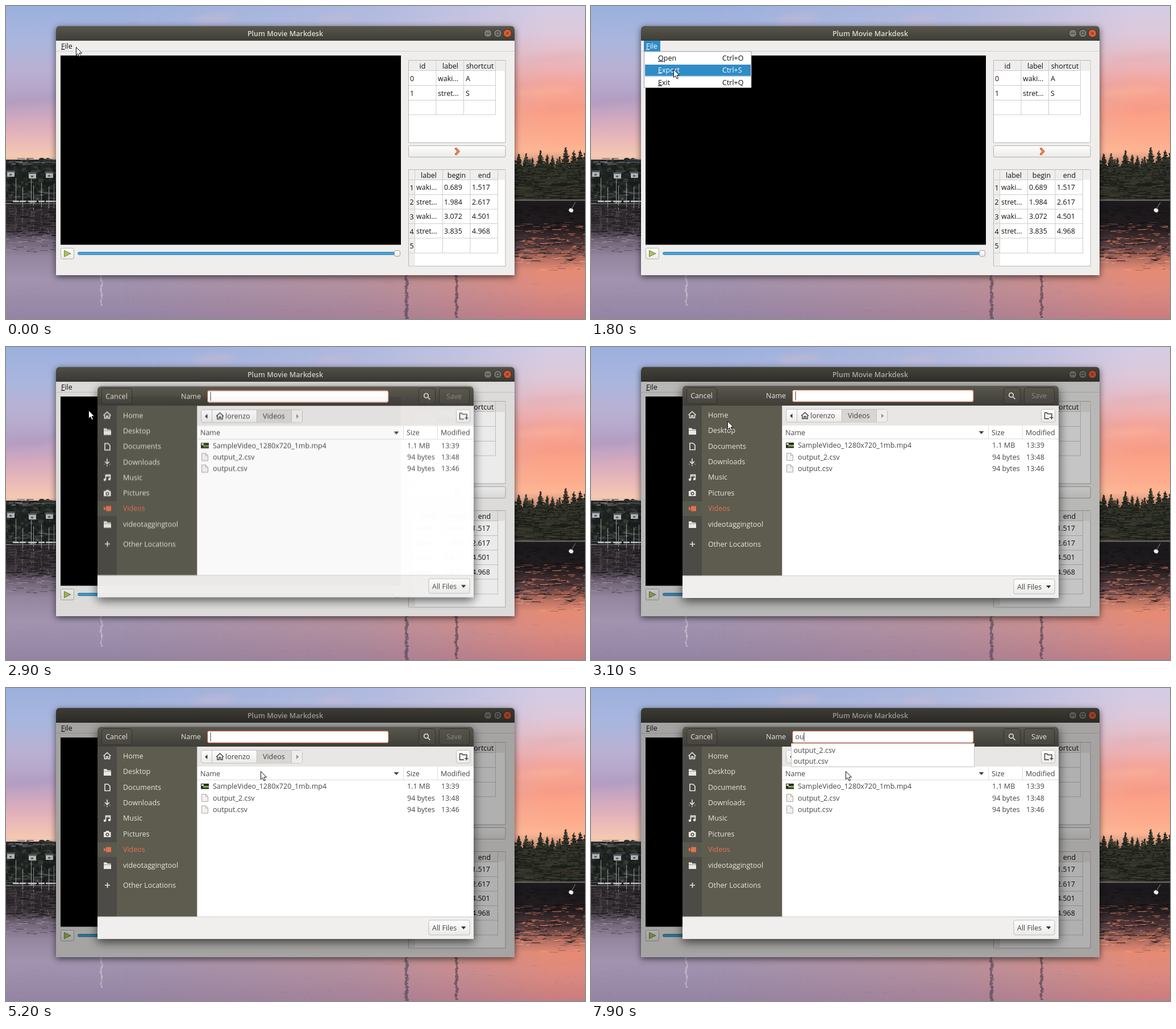
Recreate the animation shown at these times as an HTML page with a canvas. Size 1019 px wide and 550 px high, loop 8000 ms.

```html
<!DOCTYPE html>
<html lang="en">
<head>
<meta charset="utf-8">
<title>Plum Movie Markdesk</title>
<style>
html, body { margin: 0; width: 100%; height: 100%; overflow: hidden; background: #a093ae; }
.sky, canvas, svg.ui { position: absolute; left: 0; top: 0; width: 1019px; height: 550px; }
.west { background: linear-gradient(#9bb0dd 0, #a9b6de 60px, #b9b1d3 110px, #b5a4c8 155px, #c9a6c1 190px, #e6b5ba 228px, #f4c9b2 264px,
  #2b2729 348px, #393338 390px, #6f6374 412px, #94869f 440px, #a294b0 480px, #9484a4 550px); }
.east { background: linear-gradient(#d3cde6 0, #dec8d9 50px, #e9bac0 95px, #f3a59c 135px, #fb9f86 185px, #fdac8c 235px, #fdb593 255px,
  #19171a 346px, #211b1d 390px, #51383a 420px, #b87161 445px, #e68b74 465px, #dd8a7e 500px, #c87c7f 550px);
  -webkit-mask-image: linear-gradient(90deg, transparent 20%, #0005 62%, #000a 80%, #000 94%);
  mask-image: linear-gradient(90deg, transparent 20%, #0005 62%, #000a 80%, #000 94%); }

text { font: 12.5px "Open Sans", "Noto Sans", sans-serif; fill: #111; transform: translateY(4.6px); white-space: pre; }
.mid { text-anchor: middle; }
.title { font-weight: 600; fill: #dfdbd2; }
.u { text-decoration: underline; }
.lite text { fill: #e9e6df; }
.files text { fill: #454545; }
.grid { fill: none; stroke: #cfcdcb; }
.icon { fill: none; stroke: #ebe8e1; stroke-width: 1.6; }
.solid { fill: #ebe8e1; }
.frame { filter: drop-shadow(0 3px 6px #0009); }
.lift { filter: drop-shadow(0 5px 9px #000a); }

.a { animation: 8s step-end infinite; }
.menu { opacity: 0; animation-name: menu; }
.bar { opacity: 0; animation-name: bar; }
.open { animation-name: open; }
.export { animation-name: export; }
.dim { opacity: 0; animation-name: dim; }
.dialog { opacity: 0; transform-origin: 492px 254.5px; animation-name: dialog; }
.caret { animation-name: caret; }
.one { opacity: 0; animation-name: one; }
.two { opacity: 0; animation-name: two; }
.popup { opacity: 0; animation-name: popup; }
.lite .save { fill: #8b8980; animation-name: save; }
.pointer { animation-name: pointer; }

@keyframes menu { 0% { opacity: 0 } 6.25% { opacity: 1 } 33.75% { opacity: 0 } }
@keyframes bar {
  0% { opacity: 0 } 20% { opacity: 1; transform: none }
  22.5% { opacity: 1; transform: translateY(21.5px) } 33.75% { opacity: 0 }
}
@keyframes open { 0% { fill: #111 } 20% { fill: #fff } 22.5% { fill: #111 } }
@keyframes export { 0% { fill: #111 } 22.5% { fill: #fff } 33.75% { fill: #111 } }
@keyframes dim {
  0% { opacity: 0 } 36.25% { opacity: .08 } 37.5% { opacity: .16 }
  38.75% { opacity: .23 } 40% { opacity: .28 } 41.25% { opacity: .31 }
}
@keyframes dialog {
  0% { opacity: 0; transform: none } 36.25% { opacity: .98; transform: scaleY(.9946) }
  37.5% { opacity: 1; transform: none }
}
@keyframes caret {
  0% { opacity: 1; transform: none } 46.25% { opacity: 0 } 52.5% { opacity: 1 } 60% { opacity: 0 }
  65% { opacity: 1 } 75% { opacity: 0 } 80% { opacity: 1 } 90% { opacity: 0 }
  95% { opacity: 1; transform: translateX(7.5px) } 98.75% { opacity: 1; transform: translateX(15px) }
}
@keyframes one { 0% { opacity: 0 } 95% { opacity: 1 } }
@keyframes two { 0% { opacity: 0 } 98.75% { opacity: 1 } }
@keyframes popup { 0% { opacity: 0 } 95% { opacity: 1 } }
@keyframes save { 0% { fill: #8b8980 } 97.5% { fill: #e9e6df } }
@keyframes pointer {
  0% { transform: translate(123px, 72px) }
  16.25% { transform: translate(125px, 74px) }
  17.5% { transform: translate(129px, 77px) }
  20% { transform: translate(134px, 87px) }
  21.25% { transform: translate(140px, 100px) }
  22.5% { transform: translate(145px, 111px) }
  37.5% { transform: translate(175px, 117px) }
  38.75% { transform: translate(240px, 130px) }
  40% { transform: translate(312px, 143px) }
  41.25% { transform: translate(353px, 150px) }
  42.5% { transform: translate(349px, 151px) }
  43.75% { transform: translate(345px, 152px) }
  45% { transform: translate(368px, 154px) }
  46.25% { transform: translate(405px, 157px) }
  47.5% { transform: translate(440px, 160px) }
  48.75% { transform: translate(468px, 162px) }
  50% { transform: translate(483px, 162px) }
  52.5% { transform: translate(458px, 163px) }
  55% { transform: translate(452px, 152px) }
  60% { transform: translate(448px, 146px) }
}
</style>
</head>
<body>
<div class="sky west"></div>
<div class="sky east"></div>
<canvas width="1019" height="550"></canvas>

<svg class="ui" viewBox="0 0 1019 550">
<defs>
  <linearGradient id="head" x2="0" y2="1"><stop stop-color="#59574d"/><stop offset="1" stop-color="#3e3d37"/></linearGradient>
  <linearGradient id="btn" x2="0" y2="1"><stop stop-color="#fefefe"/><stop offset="1" stop-color="#ebeae9"/></linearGradient>
  <linearGradient id="dark" x2="0" y2="1"><stop stop-color="#57554b"/><stop offset="1" stop-color="#47453e"/></linearGradient>
  <linearGradient id="blue" x2="0" y2="1"><stop stop-color="#2d86bd"/><stop offset=".5" stop-color="#4db4ec"/><stop offset="1" stop-color="#2a7fb3"/></linearGradient>
  <path id="folder" d="M-6-5.500h5l1.500 2h6v1.500h-12.500zM-6-1.500h13v7.500h-13z"/>
  <path id="home" d="M-6.500 .5 0-5.500 6.500 .5M-4.500 0v5.500h3.200v-4h2.600v4h3.200V0"/>
  <path id="sheet" d="M.5.5h7l4 4v9H.5zM7.500.5v4h4" fill="#f2f1ef" stroke="#a9a7a3"/>
</defs>

<path class="frame" d="M88 473V42q0-7 7-7h793q7 0 7 7v431z" fill="#efeeed"/>
<path d="M88 61V42q0-7 7-7h793q7 0 7 7v19z" fill="url(#head)"/>
<path d="M93 35.500h797" stroke="#6d6b61"/>
<text class="mid title" x="491.500" y="48">Plum Movie Markdesk</text>
<g stroke="#33322d">
  <circle cx="848" cy="48" r="7" fill="#7d7b72"/>
  <circle cx="865.500" cy="48" r="7" fill="#7d7b72"/>
  <circle cx="882.500" cy="48" r="7" fill="#e9592f"/>
  <path d="M844.500 48h7M863 45.500h5v5h-5zM880 45.500l5 5m0-5l-5 5" fill="none"/>
</g>
<path d="M88 79.500h807" stroke="#d3d1cf"/>
<text x="97" y="70"><tspan class="u">F</tspan>ile</text>
<path d="M96 87h599v332.500h-599z"/>

<rect x="96.500" y="425.500" width="23" height="19" rx="2" fill="url(#btn)" stroke="#b3b1af"/>
<path d="M102.500 429.500v11l11.500-5.500z" fill="#a9c262" stroke="#718539"/>
<rect x="126.500" y="432.500" width="566" height="4.500" rx="2" fill="url(#blue)" stroke="#2a78a8" stroke-width=".8"/>
<rect x="683.500" y="429.500" width="10" height="10.500" rx="3" fill="url(#btn)" stroke="#9c9a98"/>

<path d="M708.500 95.500h170.500v144.500h-170.500z" fill="#fff" stroke="#b9b7b5"/>
<path d="M709 96h169.500v18H709z" fill="#efeeed"/>
<path class="grid" d="M709 113.500h153M709 139.500h153M709 165.500h153M709 191h153M757 96v95M805.500 96v95M861.500 96v95"/>
<text class="mid" x="733" y="105">id</text><text class="mid" x="782" y="105">label</text><text class="mid" x="834" y="105">shortcut</text>
<text x="711" y="127">0</text><text x="760" y="127">waki…</text><text x="809" y="127">A</text>
<text x="711" y="153">1</text><text x="760" y="153">stret…</text><text x="809" y="153">S</text>

<rect x="708.500" y="245.500" width="170.500" height="20" rx="2" fill="url(#btn)" stroke="#b3b1af"/>
<path d="M790 250.500l2.500-1.500 6 6.500-6 6.500-2.500-1.500 4-5z" fill="#f0895c" stroke="#b8431f"/>

<path d="M708.500 287.500h170.500v169.500h-170.500z" fill="#fff" stroke="#b9b7b5"/>
<path d="M709 288h169.500v17.500h-158.500v151H709z" fill="#efeeed"/>
<path class="grid" d="M709 305.500h157M709 331.500h157M709 357h157M709 382.500h157M709 408h157M709 434h157M719.500 288v146M768.500 288v146M817 288v146M865.500 288v146"/>
<text class="mid" x="744" y="297">label</text><text class="mid" x="793" y="297">begin</text><text class="mid" x="842" y="297">end</text>
<g id="clips"></g>

<path class="a dim" d="M88 473V42q0-7 7-7h793q7 0 7 7v431z"/>

<g class="a menu">
  <path d="M93 61h29v19H93z" fill="#308cc6"/>
  <text x="97" y="70" style="fill:#fff"><tspan class="u">F</tspan>ile</text>
  <path d="M93.500 80h188.500v63.500h-188.500z" fill="#fff" stroke="#a5a5a5"/>
  <path class="a bar" d="M95 81h186v20.500H95z" fill="#308cc6"/>
  <text class="a open" x="118" y="91"><tspan class="u">O</tspan>pen</text><text class="a open" x="231" y="91">Ctrl+O</text>
  <text class="a export" x="118" y="112"><tspan class="u">E</tspan>xport</text><text class="a export" x="231" y="112">Ctrl+S</text>
  <text x="118" y="134"><tspan class="u">E</tspan>xit</text><text x="231" y="134">Ctrl+Q</text>
</g>

<g class="a dialog">
  <path class="lift" d="M161 441V75q0-7 7-7h648q7 0 7 7v366z" fill="#f0efed"/>
  <path d="M161 103V75q0-7 7-7h648q7 0 7 7v28z" fill="url(#head)"/>
  <path d="M166 68.500h652" stroke="#6b695f"/>
  <g fill="url(#dark)" stroke="#34332d">
    <rect x="168.500" y="71.500" width="53" height="28" rx="4"/>
    <rect x="726.500" y="71.500" width="29" height="28" rx="4"/>
    <rect x="762.500" y="71.500" width="53" height="28" rx="4"/>
  </g>
  <g class="lite">
    <text class="mid" x="194.500" y="85.500">Cancel</text>
    <text x="308" y="85.500">Name</text>
    <text class="mid a save" x="788.500" y="85.500">Save</text>
  </g>
  <g class="icon" stroke-width="2"><circle cx="739.500" cy="84.500" r="3.800"/><path d="M742.500 87.500l4 4"/></g>
  <rect x="354.500" y="75.500" width="318.500" height="21" rx="3" fill="#fff" stroke="#b9634a"/>
  <rect x="355.500" y="76.500" width="316.500" height="19" rx="2" fill="none" stroke="#f3d3c6"/>
  <path class="a caret" d="M360 78v15.500" stroke="#333"/>

  <path d="M161 103h175.500v299H161z" fill="#5d5c4f"/>
  <path d="M161 103h34v299h-34z" fill="#4c4b46"/>
  <path d="M161 271h34v26h-34z" fill="#5a594e"/>
  <g id="places" class="lite"></g>
  <use href="#home" class="icon" x="178" y="119"/>
  <use href="#folder" class="solid" x="178" y="148"/>
  <path class="icon" d="M174 169h5.500l3.500 3.500v8h-9z"/>
  <path class="icon" d="M178 196v9m-4-4l4 4 4-4M177 208h2M172.500 206h1m9 0h1"/>
  <path class="icon" d="M175.500 233v-8.500h8v7.500M175.500 226.500h8"/>
  <g class="solid"><circle cx="174" cy="233" r="2.200"/><circle cx="182" cy="232" r="2.200"/></g>
  <path class="solid" d="M172 253h3l1.500-2h4l1.500 2h2.500v9H172z"/>
  <circle cx="178.500" cy="257.500" r="2.300" fill="none" stroke="#4c4b46" stroke-width="1.500"/>
  <path d="M176 279.500h9v9h-9zM172 280.500l3.500 2.500v2l-3.500 2.500z" fill="#e2704f"/>
  <use href="#folder" class="solid" x="178" y="312"/>
  <path class="icon" d="M174 346.500h9M178.500 342v9"/>

  <path d="M336.500 103h486.500v35H336.500z" fill="#e9e7e5"/>
  <path d="M336.500 138h486.500v263.500H336.500z" fill="#fff"/>
  <path d="M337 161.500h486M699.500 138v23M759.500 138v23" stroke="#dddbd8"/>
  <path d="M161 402h662" stroke="#d2d0cd"/>
  <rect x="343.500" y="109.500" width="178" height="22.500" rx="3" fill="url(#btn)" stroke="#c2bfbb"/>
  <path d="M441.500 110h61v21.500h-61z" fill="#d8d6d3"/>
  <path d="M503 110h18v21.500h-18z" fill="#efedeb"/>
  <path d="M362.500 110v22M441.500 110v22M502.500 110v22" stroke="#c2bfbb"/>
  <path d="M354.500 117v8l-4.500-4z" fill="#3b3b3b"/>
  <path d="M511 117v8l4.500-4z" fill="#9a9896"/>
  <use href="#home" x="376.500" y="120.500" fill="none" stroke="#444" stroke-width="1.500"/>
  <rect x="792.500" y="109.500" width="24" height="22.500" rx="3" fill="url(#btn)" stroke="#c2bfbb"/>
  <path d="M806 126h-7.500v-10.500h4l1.500 2h7v4M807.500 124h6M810.500 121v6" fill="none" stroke="#3d3d3d" stroke-width="1.400"/>
  <path d="M682.500 148h9l-4.500 5z" fill="#444"/>
  <path d="M343 168h14v9.500h-14z" fill="#26301f"/><path d="M347 172h10v3h-10z" fill="#87a850"/><path d="M344 169h4v3h-4z" fill="#d9ddd0"/>
  <use href="#sheet" x="344" y="186"/><use href="#sheet" x="344" y="206.500"/>
  <rect x="744" y="408" width="72" height="26" rx="3" fill="url(#btn)" stroke="#c0bdb9"/>
  <path d="M801 419h8.500l-4.200 5z" fill="#333"/>
  <g class="files">
    <text x="386" y="120.500">lorenzo</text><text x="452" y="120.500">Videos</text>
    <text x="342" y="150">Name</text><text x="705" y="150">Size</text><text x="765" y="150">Modified</text>
    <text x="364" y="172.500">SampleVideo_1280x720_1mb.mp4</text><text x="706" y="172.500">1.1 MB</text><text x="766" y="172.500">13:39</text>
    <text x="364" y="193">output_2.csv</text><text x="706" y="193">94 bytes</text><text x="766" y="193">13:48</text>
    <text x="364" y="213.500">output.csv</text><text x="706" y="213.500">94 bytes</text><text x="766" y="213.500">13:46</text>
    <text x="750" y="421.500">All Files</text>
    <text class="a one" x="359.500" y="85.500">o</text><text class="a two" x="367" y="85.500">u</text>
    <g class="a popup">
      <path d="M352.500 97.500h322v41h-322z" fill="#fff" stroke="#c4c2bf"/>
      <text x="356.500" y="109">output_2.csv</text><text x="356.500" y="128.500">output.csv</text>
    </g>
  </g>
</g>

<path class="a pointer" d="M.5.5v14.200l3.200-3 2.300 5.300 2.400-1-2.300-5.200h4.400z" fill="#fff" stroke="#111"/>
</svg>

<script>
const label = (x, y, s, attrs = '') => `<text x="${x}" y="${y}" ${attrs}>${s}</text>`;

const clips = [['waki…', '0.689', '1.517'], ['stret…', '1.984', '2.617'], ['waki…', '3.072', '4.501'], ['stret…', '3.835', '4.968'], []];
document.getElementById('clips').innerHTML = clips.map((row, i) => {
  const y = 318.5 + i * 25.7;
  return label(714, y + .5, i + 1, 'class="mid"') + row.map((s, c) => label(722 + c * 49, y, s)).join('');
}).join('');

const places = ['Home', 'Desktop', 'Documents', 'Downloads', 'Music', 'Pictures', 'Videos', 'videotaggingtool', 'Other Locations'];
document.getElementById('places').innerHTML = places.map((s, i) =>
  label(206, i < 8 ? 119.3 + i * 27.4 : 346.5, s, s === 'Videos' ? 'style="fill:#e8714e"' : '')).join('');

// Lake scene
const g = document.querySelector('canvas').getContext('2d');
let seed = 7;
const rnd = (a = 0, b = 1) => {
  seed = (seed * 16807) % 2147483647;
  return a + (b - a) * seed / 2147483647;
};
const box = (color, x, y, w, h) => { g.fillStyle = color; g.fillRect(x, y, w, h); };

function blob(color, x, y, rx, ry, tilt = 0) {
  g.fillStyle = color;
  g.beginPath();
  g.ellipse(x, y, rx, ry, tilt, 0, 7);
  g.fill();
}

function cloud(color, x, y, rx, ry) {
  g.filter = 'blur(6px)';
  blob(color, x, y, rx, ry, -.08);
  g.filter = 'none';
}

function pine(x, top, base, shades) {
  for (let y = top; y < base; y += 1.5) {
    const w = Math.min(9, 1 + (y - top) * .28) * rnd(.4, 1.2);
    box(shades[Math.floor(rnd(0, shades.length))], x - w + rnd(-1, 1), y, w * 2, 2);
  }
}

function ripples(n, x0, x1, y0, y1, colors) {
  for (let i = 0; i < n; i++) box(colors[i % colors.length], rnd(x0, x1), rnd(y0, y1), rnd(3, 16), rnd(.6, 1.6));
}

function wobble(color, x, y0, y1, width) {
  for (let y = y0; y < y1; y += 1.5) {
    const w = width * rnd(.4, 1.2);
    box(color, x - w / 2 + Math.sin(y * .3) + rnd(-1, 1), y, w, 1.5);
  }
}

cloud('#d9bccd70', 365, 21, 40, 6);
cloud('#d9bccd70', 578, 22, 32, 5);
cloud('#a78fbb60', 30, 168, 60, 9);
cloud('#e0adbb60', 60, 205, 50, 7);
cloud('#d9a0a850', 970, 92, 60, 6);
cloud('#ffbd9a70', 950, 150, 55, 6);
cloud('#e58f8850', 985, 178, 45, 5);

// West shore: rounded trees, houses, moored boats
box('#1e2321', 0, 270, 90, 79);
for (let i = 0; i < 260; i++) {
  const y = 270 + i * .27;
  blob(['#262d28', '#181d1b', '#343a33', '#20231f'][i % 4], rnd(0, 90), y + rnd(-2, 4), rnd(2, 6), rnd(1.5, 4));
}
ripples(40, -4, 84, 267, 279, ['#55525a', '#77707a', '#2c2f30']);
for (const [x, y] of [[2, 292], [40, 295], [70, 294]]) {
  box('#b4b4b8', x, y, 13, 8);
  box('#54565c', x - 1, y - 3, 15, 3);
  box('#5b5f66', x + 4, y + 3, 4, 3);
}
ripples(45, -4, 86, 325, 347, ['#4d4b50', '#6e6a70', '#141616']);
for (const x of [17, 29, 44, 48, 62, 75, 84]) {
  box('#a9abb3', x, 302 + x * 7 % 17, .8, 43);
  box('#c3c2c8', x - 5, 342, 11, 2.5);
  wobble('#b5adb855', x, 351, 400, 1.5);
}
box('#8d878d', 0, 347, 90, 1);
ripples(260, -8, 88, 351, 404, ['#1d1a1d', '#2d282b', '#4c444b', '#231f22']);
ripples(60, -8, 88, 400, 432, ['#5c525e', '#9486a0']);

// East shore: pines over dark water with glowing streaks
box('#1f211d', 893, 284, 126, 58);
for (let i = 0; i < 34; i++) {
  const top = 244 + i * 1.1 + rnd(0, 14);
  pine(893 + i * 47 % 130 + rnd(-2, 2), top, 341, ['#23271f', '#1a1d19', '#30342a', '#3a382d']);
}
ripples(50, 890, 1019, 318, 340, ['#3d352c', '#15171480', '#4b4034']);
box('#6d6465', 893, 340, 126, 2.5);
box('#1c1a1c', 893, 342.5, 126, 8);
ripples(130, 890, 1019, 352, 395, ['#171518', '#261f21', '#121114']);
ripples(60, 890, 1019, 380, 415, ['#a05a48', '#5a3c38']);
ripples(170, 890, 1019, 405, 448, ['#d67c60', '#1f191b', '#a6604e', '#33272a']);
ripples(30, 890, 1019, 440, 465, ['#94605a', '#eb9a7e']);
ripples(110, 0, 1019, 473, 550, ['#8d7c9d1c', '#d3b0b81c', '#64587518']);

wobble('#d9cdd8aa', 168, 473, 527, 3);
wobble('#4f4358b0', 705, 473, 550, 6);
wobble('#4d3d4cb0', 793, 473, 548, 5);

blob('#f3eeee', 994.5, 359, 4, 3.5, .5);
g.strokeStyle = '#8f8887';
g.lineWidth = 1;
g.beginPath();
g.moveTo(995, 357);
g.lineTo(1002, 345);
g.stroke();
</script>
</body>
</html>
```
